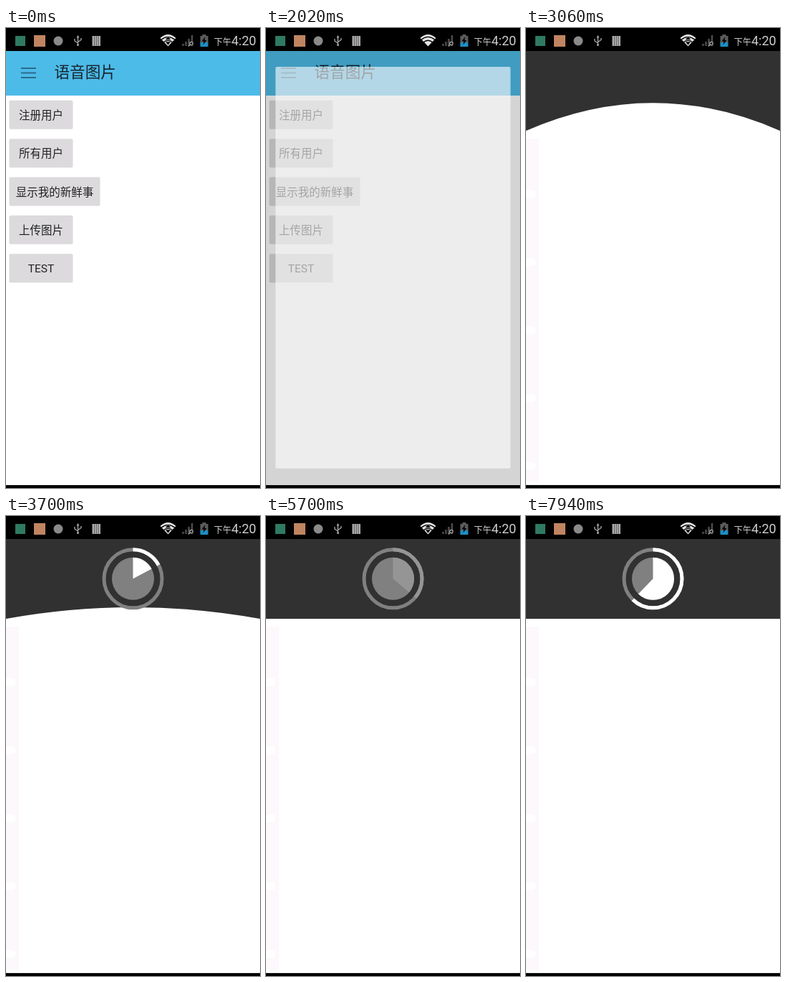
An HTML page for the animation above (8000 ms loop, 355 px wide and 640 px high).

```html
<!DOCTYPE html>
<html lang="zh">
<head>
<meta charset="utf-8">
<style>
  html, body { margin: 0; width: 100%; height: 100%; overflow: hidden; background: #fff; }
  svg { display: block; width: 355px; height: 640px; }
  text { font-family: "Noto Sans CJK SC", "Noto Sans CJK", sans-serif; fill: #222; }
  .latin { font-family: Roboto, sans-serif; }
  .buttons text { font-size: 15.5px; text-anchor: middle; }
</style>
</head>
<body>
<svg viewBox="0 0 355 640">
  <defs>
    <clipPath id="pressed"><rect x="4.5" y="207.5" width="127" height="40" rx="2"/></clipPath>
  </defs>

  <g id="home">
    <rect y="32" width="355" height="62" fill="#4dbbe8"/>
    <path d="M21 56h21M21 62.5h21M21 69h21" stroke="#2a6c8b" stroke-width="2"/>
    <text x="67.5" y="69.4" font-size="21.6" style="fill:#14242d">语音图片</text>
    <g class="buttons" id="buttons"></g>
    <circle id="ripple" cx="105" cy="231" clip-path="url(#pressed)"/>
  </g>

  <rect id="dim" y="32" width="355" height="604"/>
  <rect id="page" fill="#fff" rx="2"/>
  <g id="edge">
    <path d="M0 33H355V45H18V632H0Z" fill="#fcf8fc"/>
    <path id="notches" stroke="#fff" stroke-width="11" stroke-linecap="round"/>
  </g>

  <g id="header">
    <rect y="32" width="355" height="122" fill="#fff"/>
    <path id="wave" fill="#313131"/>
    <g id="dial" fill="none" transform="translate(177.5 87.3) rotate(-90)">
      <circle r="40.5" stroke="#808080" stroke-width="5"/>
      <circle r="29.5" fill="#808080"/>
      <circle class="sweep" r="40.5" stroke-width="5" pathLength="1"/>
      <circle class="sweep" r="14.75" stroke-width="29.5" pathLength="1"/>
    </g>
  </g>

  <!-- status bar -->
  <rect width="355" height="32"/>
  <rect y="636" width="355" height="4"/>
  <rect x="13" y="11" width="14" height="14" fill="#2f7a62"/>
  <rect x="39" y="10" width="16" height="16" fill="#c08460"/>
  <circle cx="73" cy="18" r="6.5" fill="#8a8a8a"/>
  <g stroke="#aaa" stroke-width="1.3" fill="none">
    <path d="M100.5 13V23M96 15v3l4.5 3M105 14v2.500l-4.500 3"/>
    <path d="M100.5 10l2 3.500h-4z" fill="#aaa" stroke="none"/>
    <circle cx="100.5" cy="23.5" r="1.5" fill="#aaa" stroke="none"/>
  </g>
  <rect x="120.5" y="11" width="11.500" height="14" fill="#aaa"/>
  <path d="M123.5 11v14M126.3 11v14M129.1 11v14" stroke="#444" stroke-width=".7"/>
  <path d="M215.5 14Q226.5 4 237.5 14L226.5 25.500Z" fill="#e4e4e4"/>
  <path d="M217 16.200Q226.500 8.500 236 16.200M220 20Q226.500 14.500 233 20" stroke="#000" stroke-width="1.300" fill="none"/>
  <path id="traffic" d="M226.5 11l4 5.500h-8zM226.500 24l4 -5h-8z" stroke="#e4e4e4" stroke-width=".6"/>
  <path d="M247.500 25v-3M251.500 25v-6M255.500 25v-10M260 25v-15" stroke="#4a4a4a" stroke-width="2.600"/>
  <circle cx="259" cy="21.500" r="2.200" stroke="#aaa" stroke-width="1.200"/>
  <path d="M257.500 23l-2.500 2.500" stroke="#aaa" stroke-width="1.200"/>
  <path d="M271.500 11h3v-2h5v2h3v10h-11z" fill="#5c5c5c"/>
  <rect x="271.500" y="20" width="11" height="6" fill="#1f8fc4"/>
  <path d="M278.500 12l-5 6.500h3l-1 5 5 -6.500h-3z"/>
  <text x="290.500" y="23.500" font-size="12.300" style="fill:#ccc">下午</text>
  <text class="latin" x="315" y="24" font-size="18" style="fill:#ccc">4:20</text>
</svg>

<script>
const $ = id => document.getElementById(id);
const set = (el, attrs) => { for (const k in attrs) el.setAttribute(k, attrs[k]); };
const show = (el, on) => { el.style.display = on ? '' : 'none'; };
const clamp = x => Math.min(1, Math.max(0, x));
const easeOut = x => 1 - (1 - x) ** 2;
const sweeps = document.querySelectorAll('.sweep');

$('buttons').innerHTML = ['注册用户', '所有用户', '显示我的新鲜事', '上传图片', 'TEST'].map((label, i) => {
  const y = 100.8 + i * 53.35, w = label.length > 4 ? 127 : 89, latin = label === 'TEST';
  return `<rect x="4.5" y="${y}" width="${w}" height="40" rx="2" fill="#dcdadd"/>
    <text x="${4.5 + w / 2}" y="${y + (latin ? 25.6 : 26.2)}"${latin ? ' class="latin"' : ''}>${label}</text>`;
}).join('');
$('notches').setAttribute('d', Array.from({ length: 7 }, (_, i) => `M0 ${42 + i * 94.6}h8`).join(''));

// The picture advances in 80 ms steps; a few steps are held twice as long.
function step(t) {
  const q = Math.max(0, Math.floor((t - 20) / 80) * 80 + 20);
  return [2660, 5940, 6820].includes(q) ? q - 80 : q;
}

// Bottom edge of the header: rebounds twice, then settles flat.
function rebound(t) {
  const keys = [0, 0, -300, 0, -100, 0];
  const f = easeOut(clamp((t - 2700) / 1880)) * 5, i = Math.min(4, Math.floor(f));
  return (keys[i] + (keys[i + 1] - keys[i]) * (f - i)) * .354;
}

function drawRipple(t) {
  set($('ripple'), {
    r: t < 740 ? 0 : t < 1060 ? 13 : 13 + 97 * clamp((t - 980) / 160),
    opacity: .08 * (1 - clamp((t - 1220) / 240))
  });
}

function drawPage(t) {
  const s = .8 + .2 * easeOut(clamp((t - 1772) / 640));
  set($('page'), {
    x: 177.5 * (1 - s), y: 333.4 - 302 * s, width: 355 * s, height: 604 * s,
    opacity: clamp((t - 1780) / 400)
  });
  $('dim').setAttribute('opacity', .17 * clamp((t - 1780) / 240));
  show($('edge'), t >= 2420);
}

function drawHeader(t) {
  show($('header'), t >= 2740);
  const h = 33 + 110 * clamp((t - 2660) / 160);
  $('wave').setAttribute('d', `M0 32H355V${h}Q177.5 ${h + rebound(t)} 0 ${h}Z`);

  show($('dial'), t >= 3410);
  const start = t < 5090 ? 3410 : t < 6890 ? 5090 : 6890;
  const part = clamp((t - start) / 1687);
  sweeps.forEach(el => set(el, {
    stroke: start === 5090 ? '#959595' : '#fff',
    'stroke-dasharray': part < 1 ? `${part} 2` : 'none'
  }));
}

function frame(now) {
  const t = step(now % 8000);
  drawRipple(t);
  drawPage(t);
  drawHeader(t);
  show($('traffic'), t < 500 || t >= 2740);
  requestAnimationFrame(frame);
}
requestAnimationFrame(frame);
</script>
</body>
</html>
```
